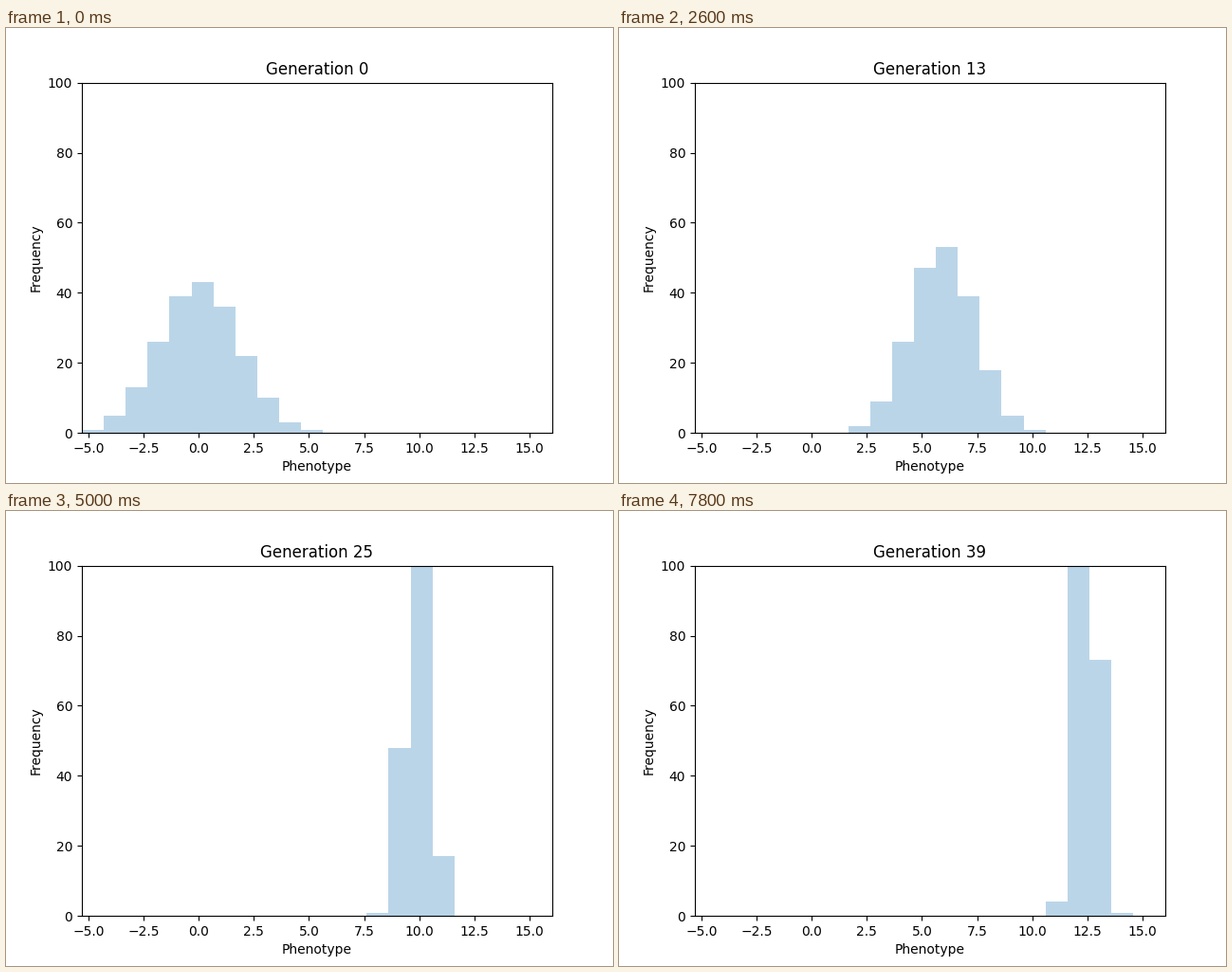
Write a matplotlib script that moves like this. It is 640 by 480 pixels and loops after 8 s.

```python
import math

import numpy as np
import matplotlib.pyplot as plt
from matplotlib.animation import FuncAnimation

GENERATIONS = 40
POPULATION = 200
EDGES = np.linspace(-5.295, 14.573, 21)

# the trait drifts upwards while its spread shrinks, with one late burst
KEY_GENS = [0, 7, 13, 20, 25, 32, 39]
MEANS = [0.02, 3.61, 5.93, 8.98, 9.94, 11.51, 12.45]
SPREADS = [1.81, 0.92, 1.44, 0.67, 0.48, 0.46, 0.41]


def normal_cdf(x, mean, spread):
    return 0.5 * (1 + math.erf((x - mean) / (spread * math.sqrt(2))))


def counts_at(gen):
    """Individuals per bin for a normally distributed phenotype."""
    mean = np.interp(gen, KEY_GENS, MEANS)
    spread = np.interp(gen, KEY_GENS, SPREADS)
    below = [normal_cdf(x, mean, spread) for x in EDGES]
    return np.round(POPULATION * np.diff(below))


fig, ax = plt.subplots(figsize=(6.4, 4.8), dpi=100)
bars = ax.bar(EDGES[:-1], counts_at(0), width=np.diff(EDGES), align="edge",
              color="tab:blue", alpha=0.3, linewidth=0)
ax.set_xlim(EDGES[0], EDGES[-1] * 1.1)
ax.set_ylim(0, 100)
ax.set_xlabel("Phenotype")
ax.set_ylabel("Frequency")
title = ax.set_title("Generation 0")


def update(gen):
    for bar, count in zip(bars, counts_at(gen)):
        bar.set_height(count)
    title.set_text(f"Generation {gen}")
    return [*bars, title]


anim = FuncAnimation(fig, update, frames=GENERATIONS, interval=200,
                     repeat=True, repeat_delay=0)
plt.show()
```
